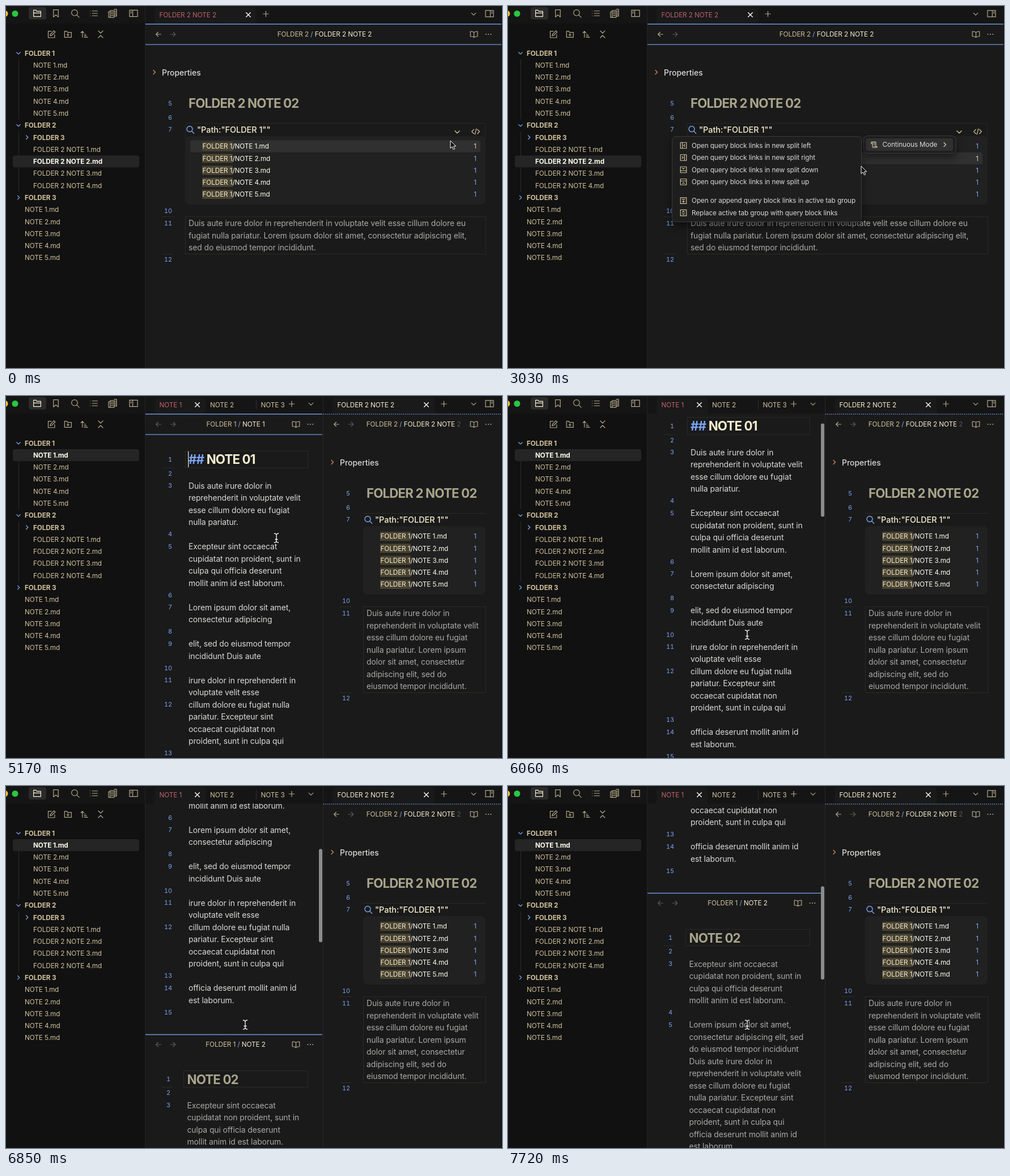
An HTML page that plays this animation: 875 px wide and 640 px high, repeating every 8000 ms.

```html
<!DOCTYPE html>
<html lang="en">
<head>
<meta charset="utf-8">
<title>Continuous mode</title>
<style>
html, body { margin: 0; width: 100%; height: 100%; overflow: hidden; background: #1a1a1a; }
svg { display: block; width: 875px; height: 640px; }
text { font-family: Inter, "Open Sans", sans-serif; font-optical-sizing: none; white-space: pre; }
.ui { font-size: 11.75px; letter-spacing: -.1px; }
.body { font-size: 13.9px; letter-spacing: -.08px; }
.head { font-size: 22.3px; letter-spacing: -.85px; font-weight: 700; }
.label { font-size: 13.9px; font-weight: 500; }
.query { font-size: 14.4px; font-weight: 500; }
.num { font-size: 10.9px; font-variant-numeric: tabular-nums; text-anchor: end; }
.tip { font-size: 11px; font-weight: 500; }
.bold { font-weight: 700; }
.mid { text-anchor: middle; }
.menu { filter: drop-shadow(0 7px 7px rgba(0, 0, 0, .45)); }
</style>
</head>
<body>
<svg id="stage" viewBox="0 0 875 640" xmlns="http://www.w3.org/2000/svg"></svg>
<script>
const LOOP = 8000, TICK = 88.8;
const C = {
  side: '#111111', bar: '#151515', main: '#1a1a1a', block: '#212121', hover: '#303030', line: '#2b2a26',
  tan: '#d2c39c', icon: '#b3a98c', faint: '#5c5a52', cream: '#f6efcf', white: '#fffdf0',
  blue: '#7ba5f2', rule: '#6d94dc', red: '#c4606c', orange: '#cf865c',
  head: '#a8a58b', text: '#dadad8', dim: '#aaaaa8'
};
const SIZE = { ui: 11.75, body: 13.9, head: 22.3, label: 13.9, query: 14.4, num: 10.9, tip: 11 };
const FRAME = 'M3 3h18v18H3z';
const ICONS = {
  folder: 'M3 20V4h6l2 3h10v13zM3 11h18',
  folderPlus: 'M3 20V4h6l2 3h10v13zM12 10v7M8.5 13.5h7',
  bookmark: 'M6 3h12v18l-6-5-6 5z',
  search: 'M18 10.5a7.5 7.5 0 1 1-15 0a7.5 7.5 0 1 1 15 0M16 16l6 6',
  list: 'M8 6h13M8 12h13M8 18h13M3 6h.01M3 12h.01M3 18h.01',
  pages: 'M2 8h4v14H2zM6 5h10v17H6zM16 2h6v17h-6M8.5 9h5M8.5 13h5M8.5 17h5M18 7h2M18 11h2M18 15h2',
  panelL: 'M2 4h20v16H2zM10 4v16M5 8h2M5 11h2',
  panelR: 'M2 4h20v16H2zM14 4v16M17 8h2M17 11h2',
  edit: 'M11 4H3v17h17v-8M18 2.5l3.5 3.5L12 15l-4 1 1-4z',
  sort: 'M7 20V4M3 8l4-4 4 4M12 12h4M12 16h6M12 20h9',
  collapse: 'M6 21l6-6 6 6M6 3l6 6 6-6',
  close: 'M5 5l14 14M19 5L5 19',
  plus: 'M12 4v16M4 12h16',
  down: 'M5 9l7 7 7-7',
  right: 'M9 5l7 7-7 7',
  back: 'M20 12H4M11 5l-7 7 7 7',
  next: 'M4 12h16M13 5l7 7-7 7',
  book: 'M12 7v14M12 7C10 4 6 4 2 4v14c4 0 8 0 10 3 2-3 6-3 10-3V4c-4 0-8 0-10 3',
  dots: 'M4 12h.01M12 12h.01M20 12h.01',
  code: 'M7 6l-6 6 6 6M17 6l6 6-6 6M14 4l-4 16',
  scroll: 'M5 4h12v14M5 4a2 2 0 0 0-2 2v3h4V6M7 9v10a2 2 0 0 0 2 2h10a2 2 0 0 0 2-2v-1H11M11 8h3M11 12h3',
  splitL: FRAME + 'M9 3v18M16 9l-3 3 3 3',
  splitR: FRAME + 'M15 3v18M8 9l3 3-3 3',
  splitD: FRAME + 'M3 15h18M9 7l3 3 3-3',
  splitU: FRAME + 'M3 9h18M9 17l3-3 3 3',
  append: FRAME + 'M8 8h8M12 11v6M9 14l3 3 3-3',
  replace: FRAME + 'M9 10l3-3 3 3M9 14l3 3 3-3'
};

// y is the middle of the capital letters
const text = (x, y, str, fill, cls = 'ui') =>
  `<text x="${x}" y="${(y + SIZE[cls.split(' ')[0]] * .364).toFixed(2)}" class="${cls}" fill="${fill}">${str}</text>`;
const span = (str, fill) => `<tspan fill="${fill}">${str}</tspan>`;
const rect = (x, y, w, h, fill, r = 0, more = '') =>
  `<rect x="${x}" y="${y}" width="${w}" height="${h}" rx="${r}" fill="${fill}" ${more}/>`;
const line = (x1, y1, x2, y2, color, w = 1, more = '') =>
  `<path d="M${x1} ${y1}L${x2} ${y2}" stroke="${color}" stroke-width="${w}" ${more}/>`;
const outline = (x, y, w, h) => rect(x, y, w, h, 'none', 0, `stroke="${C.line}"`);
const icon = (name, x, y, color = C.icon, size = 16, w = 1.2) =>
  `<path d="${ICONS[name]}" transform="translate(${x - size / 2} ${y - size / 2}) scale(${size / 24})" fill="none"
    stroke="${color}" stroke-width="${w * 24 / size}" stroke-linecap="round" stroke-linejoin="round"/>`;
const group = (id, body, more = '') => `<g id="${id}" ${more}>${body}</g>`;
const num = (x, y, n) => text(x, y, n, C.blue, 'num');
const paragraph = (x, y, lines, fill) => lines.map((s, i) => s && text(x, y + i * 21.5, s, fill, 'body')).join('');

function treeRow(row, x, label, kind) {
  const y = 83.3 + row * 21.28;
  return (kind ? icon(kind, x - 11, y, C.blue, 11, 1.3) : '') + text(x, y, label, C.tan, kind ? 'ui bold' : 'ui');
}
function activeRow(id, row, label) {
  const y = 83.3 + row * 21.28;
  return group(id, rect(12, y - 10.5, 223, 21, '#252525', 4) + text(48, y, label, C.white, 'ui bold'));
}
function sidebar() {
  const top = ['folder', 'bookmark', 'search', 'list', 'pages', 'panelL'];
  const topX = [55, 88, 122, 155, 188, 225];
  const tools = ['edit', 'folderPlus', 'sort', 'collapse'];
  let s = rect(0, 0, 245, 640, C.side) + rect(0, 0, 875, 31, C.bar) + line(245.5, 0, 245.5, 640, '#232323') +
    '<circle cx="-2" cy="13.5" r="5.5" fill="#febc2e"/><circle cx="16" cy="13.5" r="5.5" fill="#28c840"/>' +
    rect(40, 2, 31, 22, '#2a2a2a', 4);
  top.forEach((n, i) => s += icon(n, topX[i], 13, i ? C.icon : C.cream, 17));
  tools.forEach((n, i) => s += icon(n, 80.5 + i * 28.8, 50, C.icon, 16));
  s += line(22.5, 94, 22.5, 200, '#2c2c2c') + line(22.5, 222, 22.5, 328, '#2c2c2c');
  s += treeRow(0, 33, 'FOLDER 1', 'down') + treeRow(6, 33, 'FOLDER 2', 'down') +
    treeRow(7, 48, 'FOLDER 3', 'right') + treeRow(12, 33, 'FOLDER 3', 'right');
  for (let n = 1; n <= 5; n++) {
    s += n > 1 ? treeRow(n, 48, `NOTE ${n}.md`) : group('plain1', treeRow(n, 48, 'NOTE 1.md'));
    s += treeRow(12 + n, 33, `NOTE ${n}.md`);
    if (n < 5) {
      const row = treeRow(7 + n, 48, `FOLDER 2 NOTE ${n}.md`);
      s += n === 2 ? group('plain2', row) : row;
    }
  }
  return s + activeRow('active1', 1, 'NOTE 1.md') + activeRow('active2', 9, 'FOLDER 2 NOTE 2.md');
}

const tab = (x, w, label, fill) =>
  `<path d="M${x} 31V8q0-6 6-6H${x + w - 6}q6 0 6 6V31z" fill="${C.main}"/>` +
  text(x + 8.5, 15.5, label, fill) + icon('close', x + w - 14.5, 15.5, C.white, 13, 1.4);
const windowEnd = () => icon('down', 825, 14, C.icon, 13) + icon('panelR', 853, 13.5, C.icon, 17);

function paneHeader(x, end, center, y, folder, note, backColor) {
  return icon('back', x + 23, y, backColor, 13) + icon('next', x + 48.5, y, C.faint, 13) +
    text(center, y, span(folder, C.tan) + span(' / ', C.blue) + note, C.cream, 'ui mid') +
    icon('book', end - 49, y, C.icon, 15) + icon('dots', end - 23.5, y, C.icon, 13, 2);
}
const topRules = end => line(246, 32, end, 32, C.rule, 1.6) + line(246, 68.1, end, 68.1, C.rule, 1.3);

const rowY = i => 248 + i * 21.25;
function queryPane(dx, lines) {
  const bottom = 374 + lines.length * 21.5, x = 316 + dx;
  let s = icon('right', 261.5 + dx, 117, C.orange, 12, 1.4) + text(275 + dx, 117.5, 'Properties', C.text, 'label') +
    text(322 + dx, 172, 'FOLDER 2 NOTE 02', C.head, 'head') +
    line(x, 207.5, 846, 207.5, C.line) +
    icon('search', 325 + dx, 218.5, C.blue, 16, 1.4) +
    text(337 + dx, 218.5, '"Path:"FOLDER 1""', C.cream, 'query') +
    rect(x, 230, 530 - dx, 121, C.block, 8);
  [[5, 172], [6, 197], [7, 218], [10, 362], [11, 384], [12, bottom + 10]].forEach(([n, y]) => s += num(293 + dx, y, n));
  if (!dx) s += rect(325, 0, 512, 21, C.hover, 4, 'id="rowHover"');
  for (let i = 0; i < 5; i++)
    s += rect(346 + dx, rowY(i) - 8, 54, 16, '#4a4331') +
      text(346.5 + dx, rowY(i), span('FOLDER 1', C.cream) + `/NOTE ${i + 1}.md`, C.white) +
      text(827.5, rowY(i), '1', C.blue, 'ui mid');
  if (!dx) s += text(827.5, 0, '1', C.tan, 'ui mid').replace('<text', '<text id="rowCount"');
  return s + outline(x + .5, 372.5, 530 - dx, bottom - 374 + 1.5) +
    line(275 + dx, 372.5, 296 + dx, 372.5, C.line) + line(275 + dx, bottom, 296 + dx, bottom, C.line) +
    paragraph(322 + dx, 384, lines, C.dim);
}

function singleView() {
  return rect(246, 31, 629, 609, C.main) + tab(262, 180, 'FOLDER 2 NOTE 2', C.red) +
    icon('plus', 458.5, 14, C.icon, 14) + windowEnd() + topRules(875) +
    paneHeader(246, 874.5, 562, 50, 'FOLDER 2', 'FOLDER 2 NOTE 2', C.icon) +
    queryPane(0, [
      'Duis aute irure dolor in reprehenderit in voluptate velit esse cillum dolore eu',
      'fugiat nulla pariatur. Lorem ipsum dolor sit amet, consectetur adipiscing elit,',
      'sed do eiusmod tempor incididunt.']) +
    group('embedTools', `<path d="M316.5 236V207.5H845.5V236" fill="none" stroke="#262624"/>` +
      rect(783, 212, 26, 23, '#2b2b2b', 4, 'id="toolHover"') +
      icon('down', 796, 222.5, C.tan, 14, 1.4) + icon('code', 828.5, 222, C.tan, 15));
}

const NOTE1 = ['Duis aute irure dolor in', 'reprehenderit in voluptate velit', 'esse cillum dolore eu fugiat', 'nulla pariatur.', '',
  'Excepteur sint occaecat', 'cupidatat non proident, sunt in', 'culpa qui officia deserunt', 'mollit anim id est laborum.', '',
  'Lorem ipsum dolor sit amet,', 'consectetur adipiscing', '', 'elit, sed do eiusmod tempor', 'incididunt Duis aute', '',
  'irure dolor in reprehenderit in', 'voluptate velit esse', 'cillum dolore eu fugiat nulla', 'pariatur. Excepteur sint',
  'occaecat cupidatat non', 'proident, sunt in culpa qui', '', 'officia deserunt mollit anim id', 'est laborum.'];
const NOTE1_ROWS = [0, 4, 5, 9, 10, 12, 13, 15, 16, 18, 22, 23, 25];
const NOTE2 = [...NOTE1.slice(5, 9), '', 'Lorem ipsum dolor sit amet,', 'consectetur adipiscing elit, sed',
  'do eiusmod tempor incididunt', ...NOTE1.slice(0, 3), 'nulla pariatur. Excepteur sint', ...NOTE1.slice(20, 22),
  ...NOTE1.slice(23)];

function notes() {
  const top = 735.5;
  let s = topRules(558) +
    paneHeader(246, 560.5, 405, 50, 'FOLDER 1', 'NOTE 1', C.faint) +
    outline(316.5, 97, 216, 30) + line(275, 127, 296, 127, C.line) +
    text(322, 112, span('## ', C.blue) + 'NOTE 01', C.cream, 'head') + rect(321, 98, 1.3, 28, C.text, 0, 'id="caret"') +
    num(293, 112, 1) + num(293, 137, 2) + paragraph(322, 158.5, NOTE1, C.text);
  NOTE1_ROWS.forEach((row, i) => s += num(293, 158.5 + row * 21.5, i + 3));
  s += line(246, top, 558, top, C.rule, 1.6) +
    paneHeader(246, 560.5, 405, top + 17.5, 'FOLDER 1', 'NOTE 2', C.faint) +
    outline(313.5, top + 64, 219, 29) + line(275, top + 93, 293, top + 93, C.line) +
    text(319.5, top + 79, 'NOTE 02', C.head, 'head') + paragraph(319.5, top + 125, NOTE2, C.dim);
  [79, 103, 125, 211, 232.5].forEach((y, i) => s += num(290, top + y, i + 1));
  return s;
}

function splitView() {
  return rect(246, 31, 629, 609, C.main) +
    `<clipPath id="left"><rect x="246" y="31" width="313" height="609"/></clipPath>` +
    `<g clip-path="url(#left)">${group('notes', notes())}${rect(552, 33, 6, 165, '#8c8c8c', 3, 'id="thumb"')}</g>` +
    tab(262, 90, 'NOTE 1', C.red) + text(360, 15.5, 'NOTE 2', C.tan) + line(441.5, 7, 441.5, 24, '#333') +
    text(449.5, 15.5, 'NOTE 3', C.tan) + icon('plus', 504, 14, C.icon, 14) + icon('down', 538, 14, C.icon, 13) +
    line(559.5, 0, 559.5, 640, '#272727') + tab(576, 180, 'FOLDER 2 NOTE 2', C.cream) +
    icon('plus', 772.5, 14, C.icon, 14) + windowEnd() +
    line(560, 32, 875, 32, C.rule, 1.6, 'stroke-dasharray="1.5 2"') +
    paneHeader(560, 874.5, 719, 50, 'FOLDER 2', 'FOLDER 2 NOTE ' + span('2', C.faint), C.icon) +
    queryPane(314, [...NOTE1.slice(0, 3), 'nulla pariatur. Lorem ipsum', 'dolor sit amet, consectetur',
      'adipiscing elit, sed do', 'eiusmod tempor incididunt.']);
}

const MENU = [
  ['splitL', 'Open query block links in new split left', 246.5], ['splitR', 'Open query block links in new split right', 268],
  ['splitD', 'Open query block links in new split down', 289.5], ['splitU', 'Open query block links in new split up', 311],
  ['append', 'Open or append query block links in active tab group', 344.2],
  ['replace', 'Replace active tab group with query block links', 365.7]];
const panel = (x, y, w, h) => rect(x + .5, y + .5, w, h, '#1e1e1e', 7, 'stroke="#3b3b3b"');
function overlays() {
  const tip = `<path d="M796 237l5 5h-10z" fill="#0d0d0d"/>` + rect(742, 242, 108, 21, '#0d0d0d', 4) +
    text(796, 252.5, 'Continuous Mode', C.text, 'tip mid');
  const menu = panel(627, 229, 163, 31) + rect(631, 234, 154, 22, C.hover, 4, 'id="menuHover"') +
    icon('scroll', 646, 245, C.tan, 14) + text(660.5, 245, 'Continuous Mode', C.text) + icon('right', 770.5, 245, C.tan, 12, 1.4);
  const sub = panel(289, 230, 334, 151) + rect(295, 0, 323, 21.5, C.hover, 4, 'id="subHover"') +
    MENU.map(([n, label, y]) => icon(n, 309.5, y, C.tan, 14) + text(324, y, label, C.text)).join('');
  const beam = 'M-4-8Q0-8 0-5V5Q0 8-4 8M4-8Q0-8 0-5M0 5Q0 8 4 8M-2.5 2.5h5';
  return group('tip', tip) + group('menu', menu, 'class="menu"') + group('submenu', sub, 'class="menu"') +
    group('arrow', '<path d="M0 0V13.5l3.2-2.8 2.2 5 2.3-1-2.2-4.8h4.3z" fill="#111" stroke="#fff"/>') +
    group('beam', `<path d="${beam}" fill="none" stroke="#111" stroke-width="3"/><path d="${beam}" fill="none" stroke="#fff" stroke-width="1.3"/>`);
}

const stage = document.getElementById('stage');
stage.innerHTML = rect(0, 0, 875, 640, C.main) + sidebar() + group('single', singleView()) + group('split', splitView()) +
  line(874.5, 0, 874.5, 640, '#0e0e0e') + overlays();
const el = {};
stage.querySelectorAll('[id]').forEach(node => el[node.id] = node);

// keys: [tick, values...]
const POINTER = [[0, 784, 238], [3, 793, 226], [5, 793, 226], [7, 792, 226], [18, 792, 226], [22, 735, 243], [29, 735, 243],
  [34, 623, 283], [36, 592, 293], [39, 565, 288], [40, 565, 288], [48, 477, 251], [61, 477, 251], [65, 422, 422]];
const SCROLL = [[66, 0], [73, 205], [81, 387], [87, 546]];
function at(keys, tick) {
  const next = keys.findIndex(k => k[0] > tick);
  if (next === 0) return keys[0].slice(1);
  if (next < 0) return keys[keys.length - 1].slice(1);
  const a = keys[next - 1], b = keys[next], p = (tick - a[0]) / (b[0] - a[0]);
  return a.slice(1).map((v, i) => v + (b[i + 1] - v) * p);
}
const show = (node, on) => node.setAttribute('visibility', on ? 'inherit' : 'hidden');
const move = (node, x, y) => node.setAttribute('transform', `translate(${x} ${y})`);

function draw(ms) {
  const tick = Math.floor((ms + 12) / TICK);
  const [x, y] = at(POINTER, tick);
  const [scroll] = at(SCROLL, tick);
  const split = tick >= 55, overRow2 = tick >= 32 && tick < 36;

  show(el.single, !split);
  show(el.split, split);
  show(el.active1, split);
  show(el.plain1, !split);
  show(el.active2, !split);
  show(el.plain2, split);

  const row = tick < 1 || tick === 19 ? 0 : overRow2 ? 1 : -1;
  show(el.rowHover, !split && row >= 0);
  show(el.rowCount, !split && row >= 0);
  move(el.rowHover, 0, rowY(row) - 10.5);
  move(el.rowCount, 0, rowY(row));
  show(el.embedTools, !split && (tick < 20 || overRow2));
  show(el.toolHover, !split && x > 783 && y < 235 && tick < 19);

  show(el.tip, tick >= 10 && tick < 14);
  el.tip.setAttribute('opacity', Math.min(1, .9 + (tick - 10) * .05));
  show(el.menu, tick >= 14 && !split);
  show(el.menuHover, tick >= 20 && !split);
  show(el.submenu, tick >= 24 && !split);
  show(el.subHover, tick >= 24 && !split && x < 618);
  move(el.subHover, 0, 236 + 21.5 * Math.floor((y - 236) / 21.5));

  show(el.arrow, !split);
  show(el.beam, split);
  move(split ? el.beam : el.arrow, x, y);

  move(el.notes, 0, -Math.round(scroll));
  show(el.caret, split && Math.floor((tick - 55) / 7) % 2 === 0);
  show(el.thumb, tick >= 67);
  move(el.thumb, 0, scroll * .264);
}

const start = performance.now();
(function loop() {
  draw((performance.now() - start) % LOOP);
  requestAnimationFrame(loop);
})();
</script>
</body>
</html>
```
